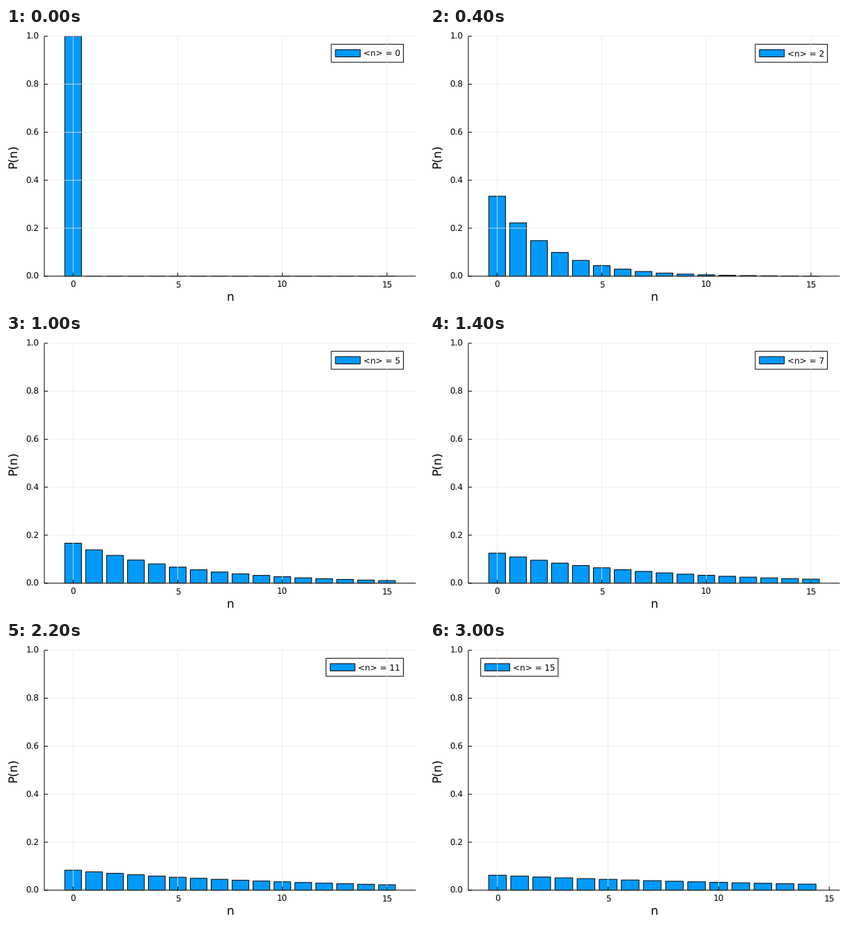
Recreate the animation shown at these times as a matplotlib script. Size 600x400 px, loop 3200 ms.

```python
import numpy as np
import matplotlib.pyplot as plt
from matplotlib.animation import FuncAnimation
from matplotlib.patches import Rectangle

plt.rcParams.update({
    "font.family": "DejaVu Sans",
    "path.snap": False,
    "text.hinting": "none",
    "text.hinting_factor": 1,
})

W, H, DPI = 600, 400, 100
PX = 72 / DPI                       # one pixel in points
LEFT, RIGHT, TOP, BOTTOM = 55.0, 588.19, 11.81, 355.8
BLUE = "#009afa"
SMALL, LARGE = 12 * PX, 16.5 * PX
FRAMES, STEP = 16, 200

fig = plt.figure(figsize=(W / DPI, H / DPI), dpi=DPI, facecolor="white")
ax = fig.add_axes([0, 0, 1, 1])


def line(x, y, color="black", width=1.0):
    ax.plot(x, y, color=color, lw=width * PX, solid_capstyle="butt")


def box(x, y, w, h, fill):
    ax.add_patch(Rectangle((x, y), w, h, fc=fill, ec="black", lw=PX,
                           joinstyle="miter"))


def label(x, y, text, size=SMALL, ha="center", **kw):
    ax.text(x, y, text, fontsize=size, ha=ha, va="baseline", **kw)


def widen(lo, hi):
    pad = 0.03 * (hi - lo)
    return lo - pad, hi + pad


def y_pos(p):
    return BOTTOM - p * (BOTTOM - TOP)


def draw_axes(x_pos):
    xs = [(v, x_pos(v)) for v in (0, 5, 10, 15)]
    ys = [(v, y_pos(v)) for v in np.arange(6) / 5]
    for _, x in xs:
        line([x, x], [TOP, BOTTOM], "#e9e9e9", 0.8)
    for _, y in ys:
        line([LEFT, RIGHT], [y, y], "#e9e9e9", 0.8)
    line([LEFT - 0.5, RIGHT], [BOTTOM, BOTTOM])
    line([LEFT, LEFT], [TOP, BOTTOM])
    for v, x in xs:
        line([x, x], [BOTTOM, BOTTOM - 5])
        label(x, 371.6, str(v))
    for v, y in ys:
        line([LEFT, LEFT + 5], [y, y])
        label(47.4, y + 4.4, f"{v:.1f}", ha="right")
    label((LEFT + RIGHT) / 2, 391, "n", LARGE)
    label(16, (TOP + BOTTOM) / 2, "P(n)", LARGE, ha="right", rotation=90,
          rotation_mode="default") if False else ax.text(
        16, (TOP + BOTTOM) / 2, "P(n)", fontsize=LARGE, rotation=90,
        rotation_mode="anchor", ha="center", va="baseline")


def draw_legend(mean, on_left):
    width = 103.5 + 7.6 * (len(str(mean)) - 1)
    gap = (RIGHT - LEFT) / 30
    x = LEFT + gap if on_left else RIGHT - gap - width
    box(x, 23.3, width, 25.8, "white")
    box(x + 6, 31, 35.6, 10.4, BLUE)
    label(x + 45.8, 41, f"<n> = {mean}", ha="left")


def draw(mean):
    ax.clear()
    ax.set(xlim=(0, W), ylim=(H, 0))
    ax.axis("off")

    # The last step has one bar fewer, which shifts the x range.
    last = mean == FRAMES - 1
    count = 15 if last else 16
    lo, hi = widen(-0.4, count - 0.6)
    lo, hi = widen(lo, max(hi, 15))

    def x_pos(n):
        return LEFT + (n - lo) / (hi - lo) * (RIGHT - LEFT)

    draw_axes(x_pos)
    for n in range(count):
        p = mean ** n / (1 + mean) ** (n + 1)
        x0, x1 = x_pos(n - 0.4), x_pos(n + 0.4)
        box(x0, y_pos(p), x1 - x0, BOTTOM - y_pos(p), BLUE)
    draw_legend(mean, last)
    return []


anim = FuncAnimation(fig, draw, frames=FRAMES, init_func=lambda: [],
                     interval=STEP, repeat=True, repeat_delay=0)
plt.show()
```
